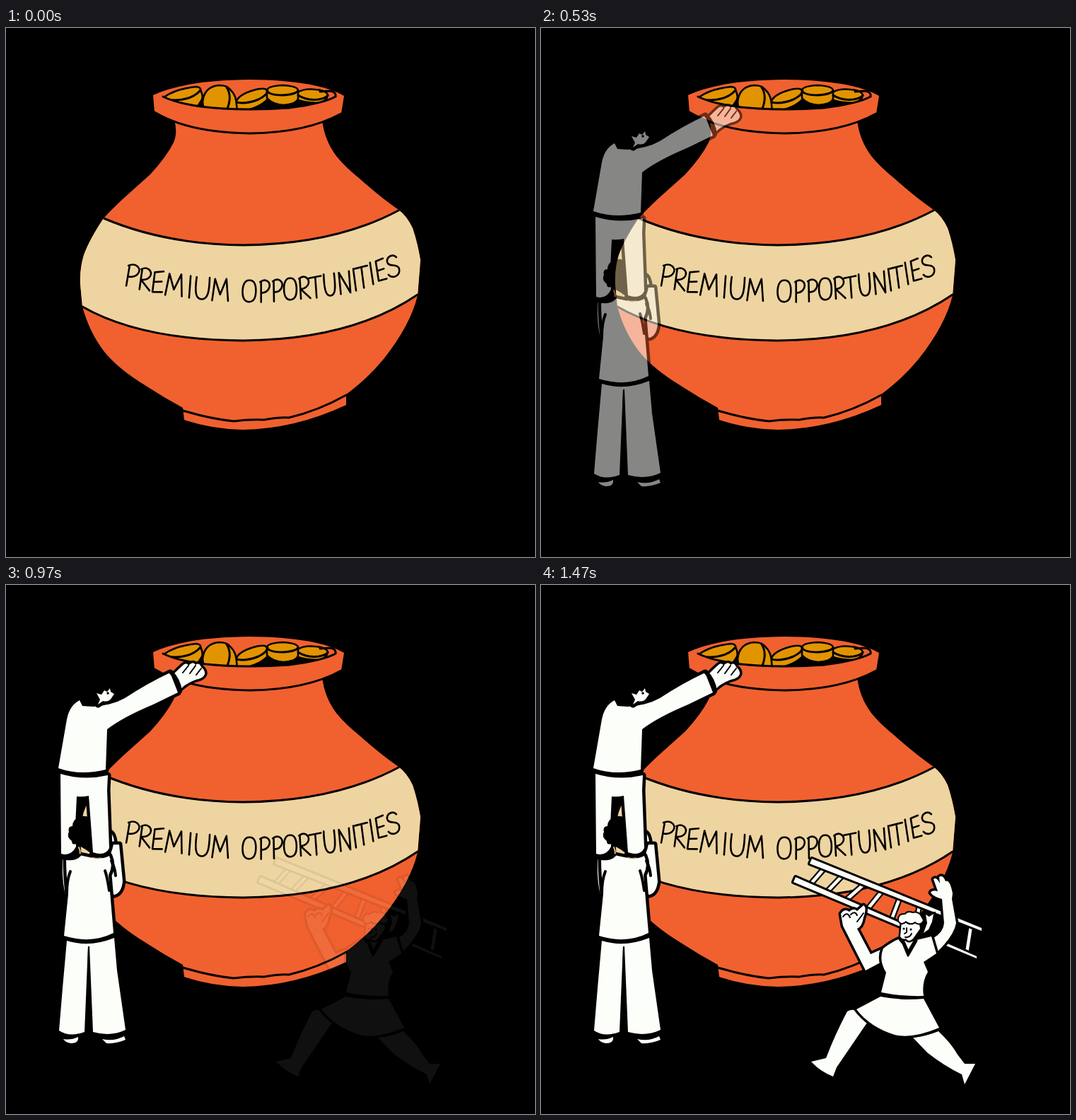
Recreate the animation shown at these times as an HTML page. Size 748 by 748 pixels, loop 2 s.

```html
<!DOCTYPE html>
<html lang="en">
<head>
<meta charset="utf-8">
<title>Premium opportunities</title>
<style>
  html, body { margin: 0; width: 100%; height: 100%; overflow: hidden; background: #000; }
  svg { display: block; width: 100%; height: 100%; }
  .clay { fill: #f0612f; }
  .band { fill: #eed4a0; }
  .line { fill: none; stroke: #000; stroke-width: 3; stroke-linecap: round; stroke-linejoin: round; }
  .coin { fill: #e29400; stroke: #000; stroke-width: 2.6; stroke-linejoin: round; }
  .person { fill: #fcfefa; stroke: #000; stroke-width: 9; stroke-linejoin: round; stroke-linecap: round; }
  .person path { paint-order: stroke; }
  .person .ink { fill: none; stroke-width: 4; }
  .person .thin { fill: none; stroke-width: 2; }
  .person .hair { fill: #000; stroke: none; }
  #carrier { stroke-width: 7; }
  #ladder { stroke-width: 6; }
  #ladder .rung { fill: none; stroke-linecap: butt; }
  #lettering { stroke-width: 2.6; }
  #lettering path { vector-effect: non-scaling-stroke; }
</style>
</head>
<body>
<svg viewBox="0 0 748 748">
  <defs>
    <path id="body" d="M238 130Q243 148 237 162Q227 182 204 207C182 227 160 245 138 269Q118 299 110 321Q104 341 105 362L108 394Q118 431 140 459Q160 483 198 506Q224 523 250 537Q290 553 322 556L400 551Q442 541 481 518Q512 495 534 468Q572 420 582 378L586 328Q582 304 575 283Q567 266 555 257Q530 240 500 213Q479 196 467 181Q450 158 447 130Z"/>
    <clipPath id="inBody"><use href="#body"/></clipPath>
    <clipPath id="mouth"><path d="M215 97L222 70H470L466 97Q448 107 400 113Q330 118 275 111Q240 106 222 97Z"/></clipPath>
  </defs>

  <g id="pot">
    <path class="clay" d="M250 537L252 554Q290 567 335 568Q408 567 481 533V516L330 500Z"/>
    <use href="#body" class="clay"/>
    <g clip-path="url(#inBody)">
      <path class="band" d="M90 245L138 269Q225 306 335 307Q465 306 555 258L600 230V368L582 377Q488 441 335 442Q190 441 108 394L90 384Z"/>
      <path class="line" d="M130 265L138 269Q225 306 335 307Q465 306 555 258L562 254M100 390L108 394Q190 441 335 442Q488 441 582 377L590 372"/>
    </g>
    <path class="line" d="M250 541Q290 553 322 556Q345 553 365 554Q388 550 400 551Q442 541 481 519"/>
    <path class="clay" d="M208 95Q252 74 345 73Q440 74 478 96L474 121Q425 148 345 149Q258 148 210 119Z"/>
    <path class="line" d="M210 119Q258 148 345 149Q425 148 474 121"/>
    <g clip-path="url(#mouth)">
      <path d="M262 112L282 98L325 106L365 97L410 96L448 104L400 118H290Z"/>
      <path class="coin" d="M223 98Q240 86 269 83Q276 84 275 88Q280 97 276 103L270 112Q245 110 223 98Z"/>
      <path class="coin" d="M412 91Q422 85 438 87Q453 88 455 95Q454 103 442 106Q424 106 410 101Z"/>
      <path class="coin" d="M326 103Q330 94 350 88Q367 83 370 89L371 99Q362 112 330 119L325 113Z"/>
      <path class="coin" d="M369 88Q370 82 391 81Q412 82 413 88V100Q410 108 392 109Q377 108 369 99Z"/>
      <path class="coin" d="M278 105Q280 83 301 81Q313 81 317 87Q328 97 326 118H280Z"/>
      <path class="line" d="M275 88Q264 101 240 102Q228 102 224 98M312 84Q320 96 313 114M326 105Q340 108 357 101Q369 95 370 89M369 89Q373 95 391 95Q409 94 413 89M413 95Q425 103 442 101Q453 99 455 95"/>
    </g>
    <path class="line" d="M222 97Q240 106 275 111Q330 118 400 113Q448 107 466 97Q467 90 458 89L444 90"/>
    <g id="lettering" class="line" role="img" aria-label="Premium opportunities"></g>
  </g>

  <g id="climbers" class="person">
    <path d="M146 350Q151 350 153 362L147 376Z"/>
    <path d="M147 384L152 367L160 367L165 419Q163 436 153 438Q147 435 145 425Z"/>
    <path d="M80 388Q79 420 84 437L90 405L96 388Z"/>
    <path d="M85 388Q98 390 104 382L123 386Q137 388 146 383Q152 397 145 410L152 492Q120 508 82 496L88 437Q85 408 85 388Z"/>
    <path class="ink" d="M91 405Q86 417 86 436M140 404Q143 412 146 432M149 390Q154 400 155 411"/>
    <path d="M77 267Q110 277 144 269L143 290L146 372Q140 384 123 378L117 298Q108 300 100 299L98 340L99 370Q92 384 78 380Z"/>
    <path class="hair" d="M103 328Q112 325 118 329L121 380Q112 373 104 369L99 366Q93 368 93 362Q85 356 89 349Q87 341 94 341Q94 332 103 328Z"/>
    <path d="M103 371Q107 379 102 386M123 385Q130 389 136 383" style="fill:none;stroke:#d6b77f;stroke-width:2"/>
    <path class="ink" d="M80 386Q96 390 104 382M120 380Q124 387 143 381"/>
    <path d="M86 503Q118 513 153 499L157 545L169 629Q148 639 123 632L118 511H116L111 632Q90 640 75 630L80 570Z"/>
    <path d="M116 510L113 634H122Z" class="hair"/>
    <path d="M81 642Q92 644 102 639Q103 648 92 648Q84 647 81 642ZM136 642Q152 646 167 638L169 643Q155 649 142 648Z"/>
    <path d="M104 163Q90 170 86 190L74 259Q105 270 141 261L142 232L143 204Q165 187 208 169L243 152L232 124Q200 139 168 160Q150 170 123 172L108 171Z"/>
    <path d="M237 126Q247 116 252 112Q257 110 258 114Q265 107 268 113Q273 109 276 116Q282 121 281 126Q279 132 268 134Q255 139 248 146Z" stroke-width="7"/>
    <path class="ink" d="M233 123Q244 134 246 150" style="stroke-width:6"/>
    <path class="thin" d="M250 124L258 114M260 125L268 114M269 127L276 118"/>
    <path d="M128 153L135 155L139 149L143 151L147 146L148 151L153 154L149 160Q145 166 137 164L130 169L133 162Z"/>
    <circle class="hair" cx="144" cy="153" r="1.8"/>
  </g>

  <g id="carrier" class="person">
    <g id="ladder">
      <path d="M383 387L623 485V489L380 394Z"/>
      <path d="M360 413L616 525V528L357 420Z"/>
    </g>
    <path d="M555 499Q569 491 570 478L567 444Q555 441 551 435Q553 431 561 433L555 416Q559 412 564 422L563 413Q568 409 572 419Q578 416 582 436L581 444L587 478Q584 496 560 519Z"/>
    <path d="M427 482L424 465Q429 457 436 462Q442 456 447 461L456 453Q461 456 456 470Q454 483 447 486L466 522L484 514L487 530L459 545Z"/>
    <path class="thin" d="M427 469Q433 461 437 470M438 466Q444 460 447 467M447 476L456 464"/>
    <path d="M433 603Q440 599 446 602Q452 614 461 619L418 682L413 695Q395 688 382 674L403 669Q416 635 433 603Z"/>
    <path d="M526 640Q545 638 562 631Q580 648 589 664L599 677L614 677L599 706L595 692Q570 680 546 661Z"/>
    <path d="M480 582Q510 588 541 585L563 626Q525 642 500 636Q465 625 446 600Q465 590 480 582Z"/>
    <path d="M514 499L515 512L519 522L530 505V494Z"/>
    <path d="M484 514Q495 505 507 500L512 507L519 523L531 502L552 497L559 521L541 533L547 547Q538 562 541 581Q510 582 481 576L488 548Q477 530 484 514Z"/>
    <path class="hair" d="M530 467L544 462L558 462L558 486L546 496L531 501Z"/>
    <path d="M544 466L549 469L555 465L553 476L548 487L541 492L546 478Z" style="stroke-width:3"/>
    <path d="M510 476L508 497Q511 502 516 500Q520 506 526 500L536 486L534 473Z" style="stroke-width:5"/>
    <path d="M506 475Q505 465 515 466Q519 461 525 464Q532 462 536 467L540 474Q536 482 529 476Q522 481 516 475Q510 481 506 475Z" style="stroke-width:4"/>
    <path class="thin" d="M517 485V491L514 493M515 498Q521 499 524 493"/>
    <path class="ink" style="stroke-width:3" d="M507 501L512 507L519 524L531 503"/>
    <circle class="hair" cx="513" cy="486" r="1.6"/><circle class="hair" cx="523" cy="487" r="1.6"/>
  </g>
</svg>
<script>
const LOOP = 2000;
const byId = id => document.getElementById(id);

function makePath(attrs) {
  const path = document.createElementNS('http://www.w3.org/2000/svg', 'path');
  for (const name in attrs) path.setAttribute(name, attrs[name]);
  return path;
}

// Hand-drawn capitals in a 100 by 100 box around the origin.
const glyphs = {
  P: 'M-36 -44L-40 50M-46 -42C15 -62 62 -38 46 -16Q28 8 -36 8',
  R: 'M-38 -44L-40 50M-46 -42C10 -62 55 -38 40 -16Q22 4 -36 6L50 50',
  E: 'M42 -50L-40 -42L-42 48L48 44M-40 2L34 -3',
  M: 'M-48 50L-34 -48L0 22L36 -50L50 50',
  I: 'M0 -50L0 50',
  U: 'M-46 -50C-54 15 -48 50 -4 50C44 50 48 10 46 -50',
  O: 'M4 -49C-35 -52 -50 -25 -50 4C-50 36 -30 50 0 49C36 48 50 25 49 -6C48 -36 30 -50 4 -49Z',
  T: 'M-50 -42L50 -48M2 -45L0 50',
  N: 'M-46 50L-42 -48L40 48L48 -50',
  S: 'M42 -38C20 -58 -38 -50 -40 -24C-40 2 46 -12 48 18C48 48 -20 58 -48 34'
};

// Each letter: character, centre x, centre y, width.
const letters = [
  ['P', 179, 350, 17], ['R', 197, 355, 16], ['E', 215, 359, 15], ['M', 238, 363, 24],
  ['I', 260, 366, 1], ['U', 278, 368, 20], ['M', 303, 370, 23], ['O', 344, 372, 19],
  ['P', 366, 372, 14], ['P', 384, 371, 14], ['O', 402, 369, 18], ['R', 422, 367, 15],
  ['T', 438, 366, 17], ['U', 458, 363, 16], ['N', 479, 360, 16], ['I', 493, 356, 1],
  ['T', 504, 352, 18], ['I', 517, 347, 1], ['E', 530, 342, 13], ['S', 547, 337, 17]
];
for (const [char, x, y, width] of letters) {
  const turn = (343 - x) / 20;
  byId('lettering').append(makePath({
    d: glyphs[char],
    transform: `translate(${x} ${y}) rotate(${turn}) scale(${width / 100} .31)`
  }));
}

// Rungs lie under the rails: a dark bar with a light bar on top.
const rungs = 'M402 399L381 423M428 409L405 433M458 422L433 444M483 432L462 458M507 443L496 472M535 455L528 484M608 482L602 520';
byId('ladder').prepend(
  makePath({ d: rungs, class: 'rung', 'stroke-width': 9 }),
  makePath({ d: rungs, class: 'rung', 'stroke-width': 4.5, stroke: '#fcfefa' })
);

// The picture advances 30 times a second, on 10 ms boundaries.
const frameAt = ms => Math.floor((Math.floor(ms / 10) + 0.5) * 0.3);

function fade(id, frame, start, steps) {
  byId(id).setAttribute('opacity', Math.min(1, Math.max(0, (frame - start + 1) / steps)));
}

function draw(ms) {
  const frame = frameAt(ms % LOOP);
  fade('climbers', frame, 9, 15);
  fade('carrier', frame, 29, 16);
}

const begin = performance.now();
function tick() {
  draw(performance.now() - begin);
  requestAnimationFrame(tick);
}
draw(0);
requestAnimationFrame(tick);
</script>
</body>
</html>
```
